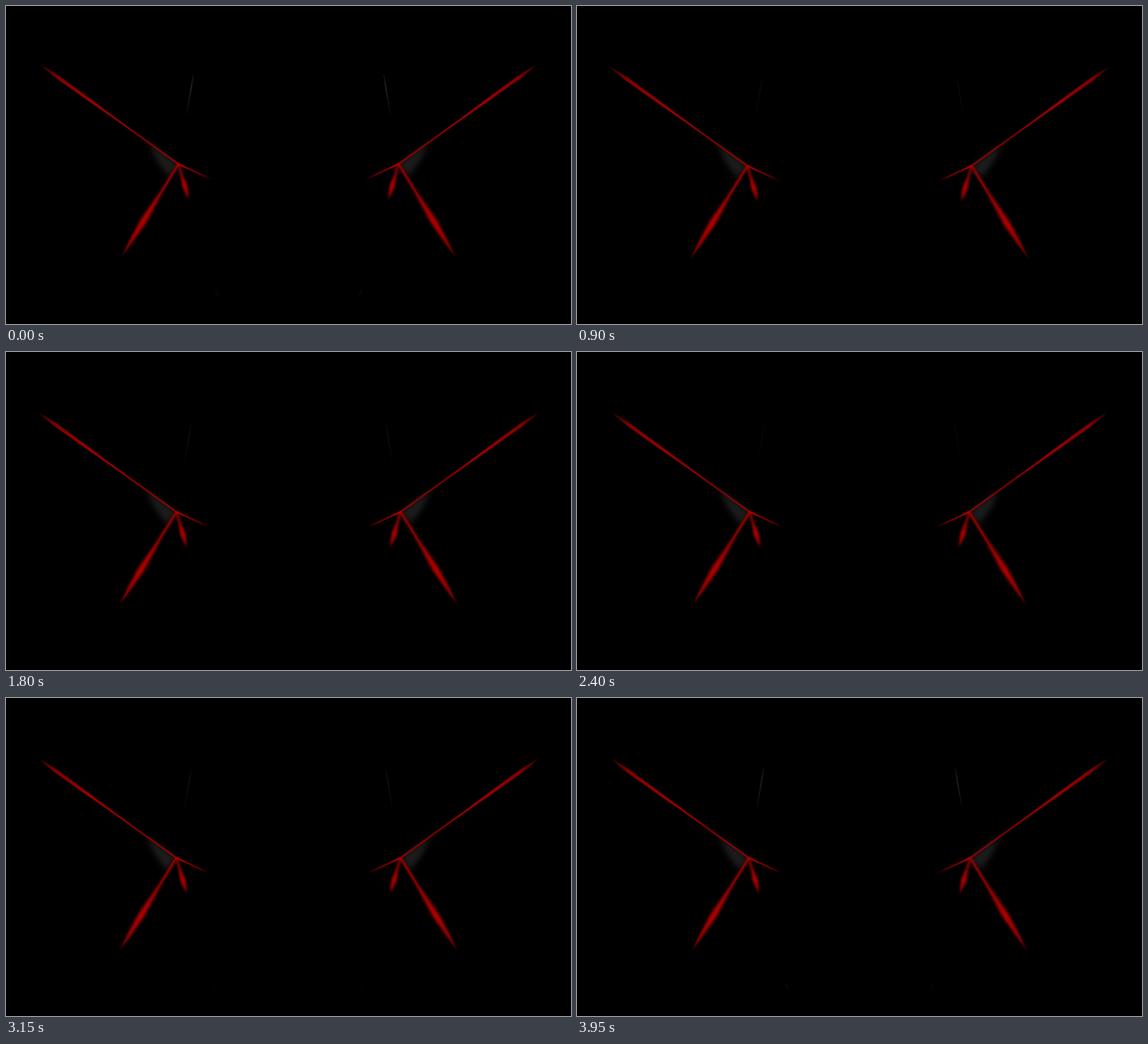
Animation of 640 by 360 pixels, one loop 4000 ms. Source, as an HTML page:

```html
<!DOCTYPE html>
<html lang="en">
<head>
<meta charset="utf-8">
<title>Red blades</title>
<style>
  html, body { margin: 0; width: 100%; height: 100%; overflow: hidden; background: #000; }
  svg { display: block; width: 100%; height: 100%; }
</style>
</head>
<body>
<svg viewBox="0 0 640 360">
  <defs>
    <linearGradient id="red">
      <stop offset="0" stop-color="#b00000"/>
      <stop offset=".3" stop-color="#880000"/>
      <stop offset=".62" stop-color="#a80000"/>
      <stop offset=".87" stop-color="#800000"/>
      <stop offset="1" stop-color="#300000"/>
    </linearGradient>
    <linearGradient id="shine" gradientUnits="userSpaceOnUse" x1="210" y1="80" x2="202" y2="126">
      <stop offset="0" stop-color="#fff" stop-opacity=".3"/>
      <stop offset=".3" stop-color="#fff"/>
      <stop offset="1" stop-color="#fff" stop-opacity=".1"/>
    </linearGradient>
  </defs>
  <g id="half">
    <path d="M193 181L158 155L168 176L182 195Z" fill="#1c1c1c" style="filter: blur(3px)"/>
    <g id="blades" transform="translate(193 181)" fill="url(#red)"/>
    <g id="glint" fill="none" stroke-width=".6">
      <path d="M210 80L202 126" stroke="url(#shine)"/>
      <path d="M235 323L238 331" stroke="#444"/>
    </g>
  </g>
  <use href="#half" transform="matrix(-1 0 0 1 640 0)"/>
</svg>
<script>
const LOOP = 4000, STEP = 50;
const [half, blades, glint] = ['half', 'blades', 'glint'].map(id => document.getElementById(id));

// A spike from the joint to (x, y): half-width `root` at the joint, `belly` at the share `peak` of its length.
function blade(x, y, { root, belly, peak, blur, opacity = 1 }) {
  const len = Math.hypot(x, y), p = len * peak, q = (p + len) / 2;
  const path = document.createElementNS('http://www.w3.org/2000/svg', 'path');
  path.setAttribute('d',
    `M0 ${-root}Q${p / 2} ${-root} ${p} ${-belly}Q${q} ${-belly * .8} ${len} 0` +
    `Q${q} ${belly * .8} ${p} ${belly}Q${p / 2} ${root} 0 ${root}Z`);
  path.setAttribute('transform', `rotate(${Math.atan2(y, x) * 180 / Math.PI})`);
  path.setAttribute('opacity', opacity);
  path.style.filter = `blur(${blur}px)`;
  blades.append(path);
}

blade(-65, 106, { root: 1.4, belly: 4.4, peak: .6, blur: 1.3, opacity: .6 });
blade(-65, 106, { root: .6, belly: 2.6, peak: .62, blur: .7 });
blade(12, 41, { root: 1, belly: 3, peak: .6, blur: .9 });
blade(39, 18, { root: 1.2, belly: .8, peak: .4, blur: .4 });
blade(-157, -113, { root: .7, belly: 1.9, peak: .87, blur: .6 });

const CENTER = .325;
const wave = (cycles, u) => Math.cos(2 * Math.PI * cycles * (u - CENTER));

// Two fast tremors beat against each other; the shift never goes past the resting place.
function pose(u) {
  const a = wave(36, u), b = wave(34, u);
  return {
    x: Math.max(0, 1.6 + 2.4 * a + 1.5 * b),
    y: -2.2 * Math.max(0, b),
    light: .18 + .14 * Math.cos(12 * Math.PI * u)
  };
}

const start = performance.now();
function draw() {
  const elapsed = (performance.now() - start) % LOOP;
  const { x, y, light } = pose(Math.floor(elapsed / STEP) * STEP / LOOP);
  half.setAttribute('transform', `translate(${x} ${y})`);
  glint.setAttribute('opacity', light);
  requestAnimationFrame(draw);
}
draw();
</script>
</body>
</html>
```
